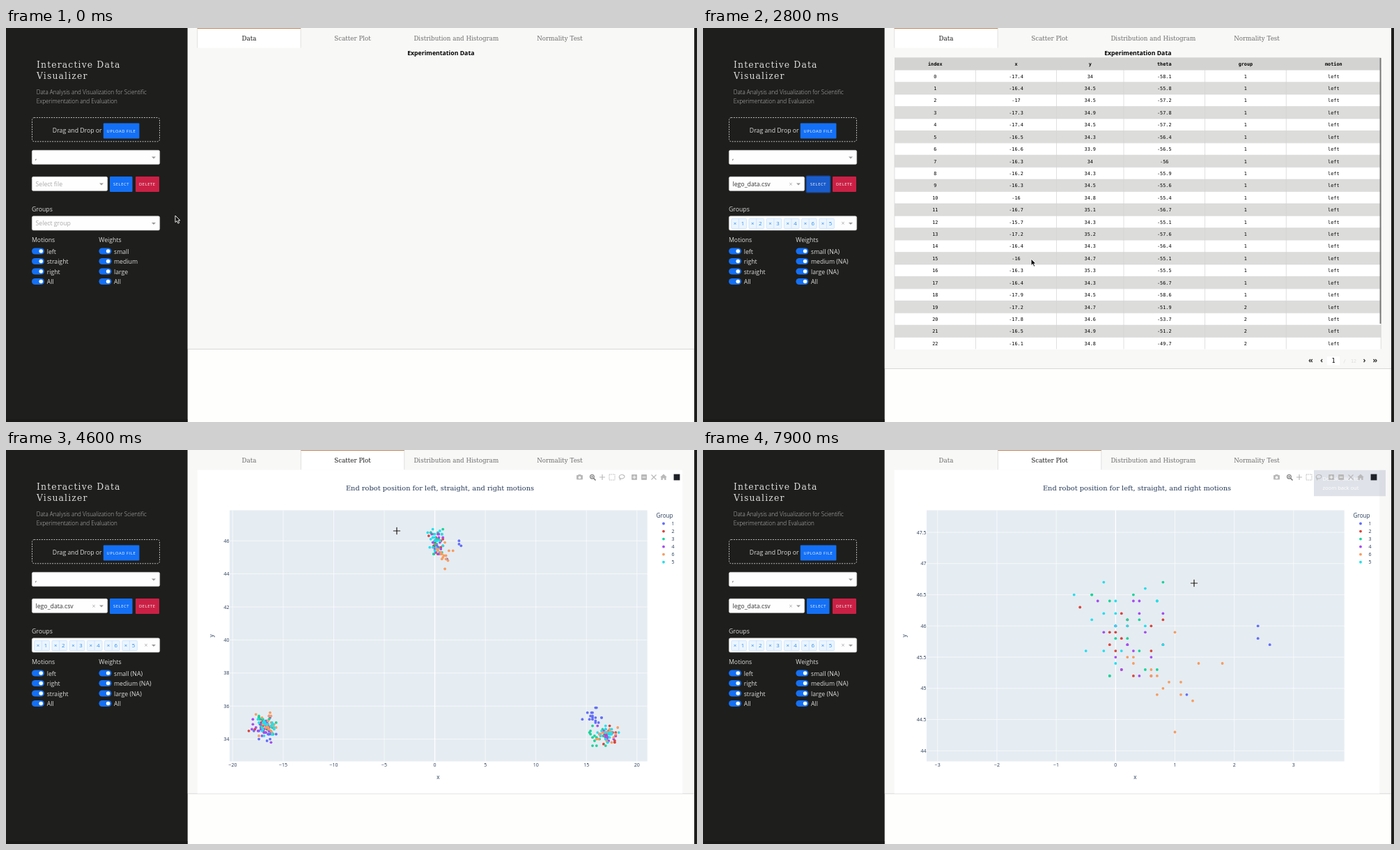
An HTML page that plays this animation: 992x565 px, repeating every 8000 ms.

```html
<!DOCTYPE html>
<html lang="en">
<head>
<meta charset="utf-8">
<title>Interactive Data Visualizer</title>
<style>
html, body { margin: 0; width: 100%; height: 100%; overflow: hidden; background: #1e1e1c; }
svg { display: block; width: 100%; height: 100%; }
text { font-family: "Open Sans", sans-serif; font-size: 8.73px; white-space: pre; }
.serif { font-family: "DejaVu Serif", serif; }
.mono { font-family: "DejaVu Sans Mono", monospace; font-size: 6.8px; text-anchor: middle; }
.mid { text-anchor: middle; }
.end { text-anchor: end; }
.bold { font-weight: 700; }
.head { font-size: 12.4px; letter-spacing: 1.14px; fill: #dcdcda; }
.desc { font-size: 8.15px; font-weight: 300; fill: #bdbdbb; }
.side { fill: #dcdcda; }
.btn { font-size: 5.82px; letter-spacing: .58px; fill: #fff; }
.hint { fill: #aaa; }
.value { fill: #333; }
.tag { font-size: 7.8px; fill: #2b8ae6; text-anchor: middle; }
.title { font-size: 9.83px; fill: #263a58; }
.tick { font-size: 7px; fill: #263a58; }
.axis { font-size: 8.15px; fill: #263a58; }
.note { font-size: 7.57px; fill: #fff; }
.pager { font-size: 11px; fill: #333; }
</style>
</head>
<body>
<svg id="stage" viewBox="0 0 992 565" preserveAspectRatio="none"></svg>
<script>
const LOOP = 8000, STEP = 100;
const BLUE = '#1470f5';
const COLORS = { 1: '#636efa', 2: '#d8443a', 3: '#15d49a', 4: '#a64df0', 6: '#f79c5f', 5: '#22dfee' };
const ORDER = [1, 2, 3, 4, 6, 5];
const PLOT = { x: 321, y: 86.5, w: 599.7, h: 360 };

const text = (x, y, str, cls = '', more = '') => `<text x="${x}" y="${y}" class="${cls}" ${more}>${str}</text>`;
const rect = (x, y, w, h, fill, more = '') => `<rect x="${x}" y="${y}" width="${w}" height="${h}" fill="${fill}" ${more}/>`;
const path = (d, more) => `<path d="${d}" ${more}/>`;
const stroke = (d, c = '#b9b9b9', w = 1.2) => path(d, `stroke="${c}" stroke-width="${w}" fill="none"`);
const dot = (x, y, r, fill) => `<circle cx="${x}" cy="${y}" r="${r}" fill="${fill}"/>`;
const group = (id, body) => `<g id="${id}">${body}</g>`;
const range = (from, to, step = 1) =>
  Array.from({ length: Math.round((to - from) / step) + 1 }, (_, i) => from + i * step);

// ---- data: one cluster per motion, drift = [dx, dy, count] of groups that stand apart ----
const CLUSTERS = [
  { x: -16.8, y: 34.85, w: 1.3, h: .85, n: 19, drift: { 1: [.1, -.3], 2: [-.3, 0], 4: [-.3, -.2], 6: [.3, .1] } },
  { x: .1, y: 45.9, w: 1.15, h: 1, n: 16, drift: { 1: [1.6, -.3, 4], 5: [0, .2], 6: [.9, -.7] } },
  { x: 17.1, y: 34.3, w: 1.3, h: .65, n: 17, drift: { 1: [-1.7, 1], 2: [.4, 0], 3: [-.8, -.1] } }
];
let seed = 11;
function rand() {
  seed = (seed * 16807) % 2147483647;
  return seed / 2147483647;
}
const spread = () => rand() + rand() - 1;
const tenth = v => Math.round(v * 10) / 10;

const points = CLUSTERS.flatMap(c => ORDER.flatMap(g => {
  const [dx, dy, n = c.n] = c.drift[g] || [0, 0];
  return Array.from({ length: n }, () =>
    ({ g, x: tenth(c.x + dx + spread() * c.w), y: tenth(c.y + dy + spread() * c.h) }));
}));
const records = points.slice(0, 23).map(({ g, x, y }, i) =>
  [i, x, y, tenth(1.75 * x - 27.4 + (g - 1) * 5.5 + spread() * .8), g, 'left']);

// ---- sidebar ----
const caret = (x, y) => path(`M${x - 3} ${y - 1.5}h6l-3 3z`, 'fill="#999"');
const field = (y, w) =>
  rect(37.3, y + .3, w - .6, 20.3, '#fefefe', 'rx="2" stroke="#ccc" stroke-width=".6"') + caret(37 + w - 9, y + 11);
const button = (x, y, w, label, fill, tx) =>
  rect(x, y, w, 22, fill, 'rx="1"') + text(tx, y + 13.2, label, 'btn');
const ROWS = range(320, 363.5, 14.5);
const toggle = (x, y) => rect(x, y - 4.6, 18, 9.2, BLUE, 'rx="4.6"') + dot(x + 13.2, y, 2.8, '#fff');
const labels = (x, list) => list.map((s, i) => text(x, ROWS[i] + 3.7, s, 'side')).join('');

const tags = ORDER.map((g, i) => {
  const x = 40.8 + i * 25.2;
  return rect(x, 273.5, 21.6, 14, '#ebf5ff', 'stroke="#c2e0ff" stroke-width=".7" rx="1"') +
    stroke(`M${x + 10.6} 273.5v14`, '#c2e0ff', .7) +
    text(x + 5.3, 283.2, '×', 'tag') + text(x + 16.2, 283.4, g, 'tag');
}).join('');

const sidebar =
  rect(0, 0, 260.5, 565, '#1e1e1c') + rect(0, 561, 260.5, 4, '#1a1a18') + rect(988, 0, 4, 565, '#1e1e1c') +
  text(44, 57.2, 'Interactive Data', 'serif head') + text(44, 73.2, 'Visualizer', 'serif head') +
  text(43.7, 94.5, 'Data Analysis and Visualization for Scientific', 'desc') +
  text(43.7, 107.5, 'Experimentation and Evaluation', 'desc') +
  rect(37.5, 128.5, 183, 34.3, 'none', 'rx="3" stroke="#c8c8c6" stroke-dasharray="1.8 1.7"') +
  text(66.8, 149.8, 'Drag and Drop or', 'side') +
  button(139.8, 136.5, 51.6, 'UPLOAD FILE', BLUE, 144.6) +
  field(175, 184) + text(42, 188.5, ',', 'value') +
  field(213, 109) + group('noFile', text(42.5, 227, 'Select file', 'hint')) +
  group('file', text(42.5, 227, 'lego_data.csv', 'value') + text(126, 227, '×', 'mid hint')) +
  button(149, 213, 32.5, 'SELECT', BLUE, 154) +
  group('focus', rect(148.3, 212.3, 34.4, 23.6, '#1a5ccb', 'rx="2" stroke="#1b4590" stroke-width="1.4"') +
    text(154, 226.2, 'SELECT', 'btn')) +
  button(186, 213, 34, 'DELETE', '#cb2045', 191) +
  text(37, 263, 'Groups', 'side') + field(269.5, 184) +
  group('noTags', text(42.5, 283.4, 'Select group', 'hint')) +
  group('tags', tags + text(201, 283, '×', 'mid hint')) +
  text(37, 306.7, 'Motions', 'side') + text(133.3, 306.7, 'Weights', 'side') +
  ROWS.map(y => toggle(37, y) + toggle(133.4, y)).join('') +
  group('before', labels(58.7, ['left', 'straight', 'right', 'All']) + labels(155, ['small', 'medium', 'large', 'All'])) +
  group('after', labels(58.7, ['left', 'right', 'straight', 'All']) +
    labels(155, ['small (NA)', 'medium (NA)', 'large (NA)', 'All'])) +
  group('menu', rect(37.3, 234, 108.4, 41.5, '#fff', 'stroke="#ccc" stroke-width=".6"') +
    rect(37.6, 254.6, 107.8, 20.6, '#ebf5ff') +
    text(42.5, 247.5, 'robot_data.csv', 'value') + text(42.5, 268, 'lego_data.csv', 'value'));

// ---- tabs ----
const TABS = ['Data', 'Scatter Plot', 'Distribution and Histogram', 'Normality Test'];
const tabs = active => TABS.map((name, i) => {
  const x = 274.7 + i * 148.7, on = i === active;
  return (on ? rect(x, 0, 148.4, 28.6, '#fff') +
      stroke(`M${x} 0v28.5M${x + 148.4} 0v28.5`, '#d6d6d6', .7) + rect(x, 0, 148.4, 1.1, '#c08a60') : '') +
    text(x + 74.2, 17.5, name, 'serif mid', `fill="${on ? '#1a1a1a' : '#6c6c6c'}"`);
}).join('');

// ---- table ----
const EDGES = [275, 391.5, 507.5, 604, 720.5, 837.3, 973.3];
const ROW = 17.42;
const cells = (list, y, cls) => list.map((v, c) => text((EDGES[c] + EDGES[c + 1]) / 2, y, v, cls)).join('');
const rows = records.map((record, i) => {
  const y = 60.3 + i * ROW;
  return rect(275, y, 698.3, ROW, i % 2 ? '#dcdcdb' : '#fff') +
    stroke(`M275 ${y}H973.3`, '#d3d3d3', .6) + cells(record, y + 11.3, 'mono');
}).join('');
const table = rect(275, 42.3, 698.3, 18, '#d3d3d2') +
  cells(['index', 'x', 'y', 'theta', 'group', 'motion'], 54, 'mono bold') + rows +
  stroke(EDGES.map(x => `M${x} 60V460.5`).join(''), '#d3d3d3', .7) +
  rect(971.6, 43, 1.9, 381, '#777') +
  rect(896, 471, 18, 12.5, '#fff') + text(905, 480, '1', 'mono', 'style="font-size:8.5px"') +
  text(921, 479.5, '/', 'mono', 'fill="#ddd"') + text(934, 479.5, '12', 'mono', 'fill="#ddd"') +
  text(872.5, 480.3, '«', 'pager mid bold') + text(888, 480.3, '‹', 'pager mid bold') +
  text(949.5, 480.3, '›', 'pager mid bold') + text(965, 480.3, '»', 'pager mid bold');

// ---- chart ----
function plot({ sx, x0, sy, y0, xTicks, yTicks, titleX }) {
  const px = v => x0 + v * sx, py = v => y0 - v * sy;
  const right = PLOT.x + PLOT.w, bottom = PLOT.y + PLOT.h;
  return rect(PLOT.x, PLOT.y, PLOT.w, PLOT.h, '#e5ecf2') +
    xTicks.map(v => stroke(`M${px(v)} ${PLOT.y}V${bottom}`, '#fff', v ? .65 : 1.3) +
      text(px(v), 454, String(v).replace('-', '−'), 'tick mid')).join('') +
    yTicks.map(v => stroke(`M${PLOT.x} ${py(v)}H${right}`, '#fff', .65) +
      text(320.6, py(v) + 2.6, v, 'tick end')).join('') +
    text(0, 0, 'y', 'axis mid', `transform="translate(${titleX} 266.5) rotate(-90)"`) +
    '<g clip-path="url(#area)">' +
    ORDER.map(g => points.filter(p => p.g === g).map(p =>
      dot(px(p.x).toFixed(1), py(p.y).toFixed(1), 1.9, COLORS[g])).join('')).join('') + '</g>';
}
const full = { sx: 14.51, x0: 615.6, sy: 23.7, y0: 130.2 + 46 * 23.7,
  xTicks: range(-20, 20, 5), yTicks: range(34, 46, 2), titleX: 297.5 };
const near = { sx: 85.17, x0: 592.3, sy: 89.5, y0: 252.3 + 46 * 89.5,
  xTicks: range(-3, 3), yTicks: range(44, 47.5, .5), titleX: 291.5 };

const box = x => rect(x - 4, 35, 8, 8, '#b9b9b9', 'rx="1"');
const modebar =
  rect(819, 36, 9, 6.6, '#b9b9b9', 'rx="1"') + rect(821.5, 35, 4, 2, '#b9b9b9') + dot(823.5, 39.4, 1.8, '#fff') +
  dot(841.4, 38.3, 3.4, '#777') + dot(841.4, 38.3, 2.2, '#fff') + stroke('M843.5 40.5l3 3', '#777', 1.6) +
  stroke('M839.8 38.3h3.2M841.4 36.7v3.2', '#777', .8) +
  stroke('M852 39h8M856 35v8') +
  rect(866, 35, 8, 8, 'none', 'stroke="#b9b9b9" stroke-dasharray="1.5 1"') +
  stroke('M881 40.5c-2-2 0-5 3-5s5 2 3.5 4-5 2-6 .8c-1 1 1 1.5 0 3') +
  box(902) + stroke('M899.5 39h5M902 36.5v5', '#fff', 1) +
  box(916) + stroke('M913.5 39h5', '#fff', 1) +
  stroke('M926.5 35.5l7 7M933.5 35.5l-7 7') +
  path('M944 34.6l4.8 4.4h-1.2v4h-2.4v-2.6h-2.4v2.6h-2.4v-4h-1.2z', 'fill="#b9b9b9"') +
  rect(958.6, 34.6, 8.8, 8.8, '#1f2228');

const legend = text(933.6, 97, 'Group', 'axis') + ORDER.map((g, i) => {
  const y = 105.5 + i * 11.05;
  return dot(944, y, 1.9, COLORS[g]) + text(955.5, y + 2.6, g, 'tick');
}).join('');

const chart = rect(274.7, 28.5, 696.5, 464, '#fff') +
  text(623, 57.6, 'End robot position for left, straight, and right motions', 'serif mid title') +
  group('full', plot(full)) + group('near', plot(near)) +
  text(620.5, 471.5, 'x', 'axis mid') + legend +
  group('drag', '<path id="dim" fill-rule="evenodd"/>' +
    '<path id="cornerEdge" fill="none" stroke="#444" stroke-width="2.8"/>' +
    '<path id="corner" fill="none" stroke="#fff" stroke-width="1.5"/>') +
  group('note', rect(877, 28.8, 103, 37.4, '#8c97af') +
    text(889.5, 44, 'Double-click to', 'note') + text(889.5, 57, 'zoom back out', 'note')) +
  modebar;

// ---- pointers ----
const pointers =
  group('arrow', path('M0 0V9.6L2.3 7.6L4 11.2L5.7 10.4L4.1 7H7z', 'fill="#111" stroke="#fff" stroke-width=".9"')) +
  group('hand', path('M-.9 .8Q0-.6 1 .8V4.2L5.2 5Q6.3 5.4 6.1 6.6L5.3 10.6H-.5L-3.6 6.5Q-3.7 5.2-2.4 5.5L-.9 6.8z',
    'fill="#fff" stroke="#111" stroke-width=".9" stroke-linejoin="round"')) +
  group('cross', stroke('M-5.7 0H5.7M0-5.7V5.7', '#fff', 2.4) + stroke('M-5.2 0H5.2M0-5.2V5.2', '#111', 1.2));

const stage = document.getElementById('stage');
stage.innerHTML =
  `<clipPath id="area">${rect(PLOT.x, PLOT.y, PLOT.w, PLOT.h, '#000')}</clipPath>` +
  rect(260.5, 0, 727.5, 565, '#fefefd') + rect(260.5, 0, 727.5, 460, '#f8f8f7', 'id="panel"') +
  rect(260.5, 460, 727.5, .8, '#cfcfcf', 'id="rule"') + sidebar +
  group('dataTab', tabs(0) + text(624.3, 39, 'Experimentation Data', 'mid bold')) +
  group('table', table) + group('plotTab', tabs(1) + chart) + group('pointer', pointers);

const $ = id => document.getElementById(id);
const show = (id, on) => $(id).setAttribute('display', on ? 'inline' : 'none');
const between = (t, a, b) => t >= a && t < b;

// ---- motion: each move runs from start to end and stops at x, y ----
const MOVES = [
  [300, 700, 137, 223], [1000, 1400, 92, 264], [1600, 1900, 165, 224], [2400, 2600, 244, 274],
  [2600, 2800, 471, 331], [3100, 3400, 508, 94], [3500, 3800, 513, 23], [4200, 4600, 561, 116],
  [5100, 5500, 402, 220], [5500, 5900, 583, 114], [5900, 6000, 572, 113], [6000, 6200, 579, 94],
  [6500, 6600, 570, 88], [6600, 6900, 662, 142], [7100, 7300, 669, 178], [7400, 7500, 672, 183],
  [7600, 7900, 705, 191]
];
function pointerAt(t) {
  let x = 243, y = 269;
  for (const [start, end, toX, toY] of MOVES) {
    const u = Math.min(1, Math.max(0, (t - start) / (end - start)));
    x += (toX - x) * u;
    y += (toY - y) * u;
  }
  return [x, y];
}

function drawDrag(t, x, y) {
  const l = 569.5, top = PLOT.y;
  const r = Math.min(x + 1.5, 671.6), b = Math.min(y + 2.5, 181.6);
  $('dim').setAttribute('d', `M${PLOT.x} ${top}h${PLOT.w}v${PLOT.h}h${-PLOT.w}zM${l} ${top}H${r}V${b}H${l}z`);
  $('dim').setAttribute('fill-opacity', Math.min(.4, .12 + (t - 6700) / 500));
  const bracket = (cx, cy, dx, dy) => `M${cx + dx * 5.5} ${cy}H${cx}V${cy + dy * 5.5}`;
  const d = bracket(l, top, 1, 1) + bracket(r, top, -1, 1) + bracket(l, b, 1, -1) + bracket(r, b, -1, -1);
  $('corner').setAttribute('d', d);
  $('cornerEdge').setAttribute('d', d);
}

function render(ms) {
  const t = Math.floor(ms / STEP) * STEP;
  const chosen = t >= 1400, loaded = t >= 2400, scatter = t >= 4300, zoomed = t >= 7700;
  show('noFile', !chosen);
  show('file', chosen);
  show('menu', between(t, 900, 1400));
  show('focus', between(t, 2200, 4000));
  show('noTags', !loaded);
  show('tags', loaded);
  show('before', !loaded);
  show('after', loaded);
  show('dataTab', !scatter);
  show('table', between(t, 2800, 4300));
  show('plotTab', scatter);
  show('full', !zoomed);
  show('near', zoomed);
  const bottom = scatter ? 492.5 : t >= 2800 ? 488 : 460;
  $('panel').setAttribute('height', bottom);
  $('rule').setAttribute('y', bottom);

  const [x, y] = pointerAt(t);
  const dragging = between(t, 6700, 7700);
  show('drag', dragging);
  if (dragging) drawDrag(t, x, y);
  const u = Math.max(0, (t - 7605) / 700);
  $('note').setAttribute('opacity', zoomed ? 3.6 * u ** 3 : 0);

  const hand = between(t, 700, 1500) || between(t, 1900, 2500) || between(t, 3800, 4400);
  const cross = t >= 4500;
  show('hand', hand);
  show('cross', cross);
  show('arrow', !hand && !cross);
  $('pointer').setAttribute('transform', `translate(${x.toFixed(1)} ${y.toFixed(1)})`);
}

const start = performance.now();
function tick() {
  render((performance.now() - start) % LOOP);
  requestAnimationFrame(tick);
}
tick();
</script>
</body>
</html>
```
